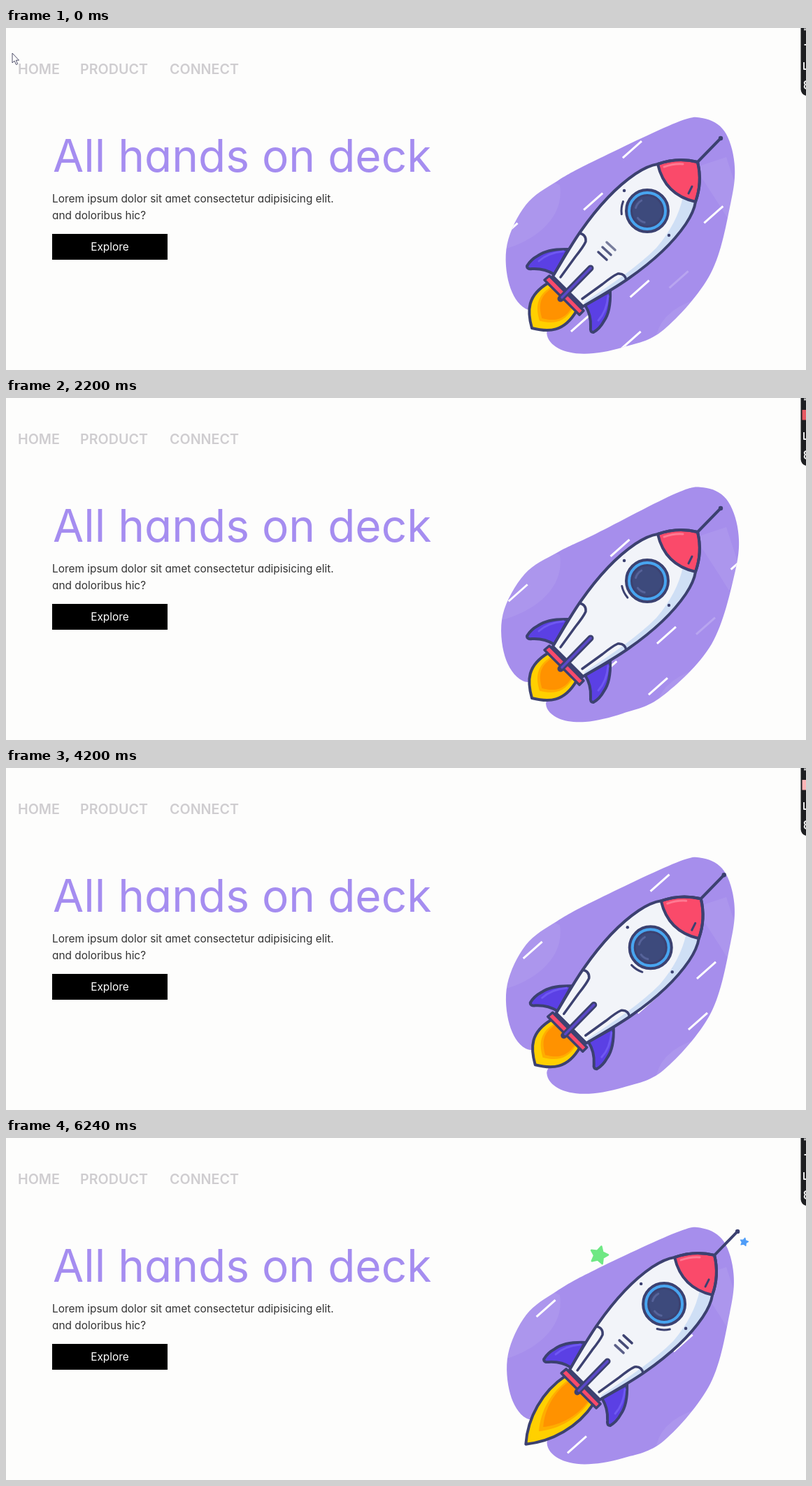
Write an HTML page with a canvas that moves like this. It is 1144 px wide and 490 px high and loops after 6280 ms.

```html
<!DOCTYPE html>
<html lang="en">
<head>
<meta charset="utf-8">
<title>All hands on deck</title>
<style>
  html, body { margin: 0; width: 100%; height: 100%; overflow: hidden; background: #fdfdfc; }
  canvas, svg { position: absolute; left: 0; top: 0; display: block; }
  text { font-family: Inter, "Open Sans", sans-serif; font-feature-settings: "cv11"; }
  .nav { font-size: 19.7px; font-weight: 600; fill: #cfcdd0; }
  .title { font-size: 64px; fill: #a58df0; }
  .copy { font-size: 15.4px; fill: #333; }
  .button { font-size: 15.4px; fill: #fff; text-anchor: middle; }
</style>
</head>
<body>
<svg width="1144" height="490">
  <g class="nav">
    <text x="17" y="66">HOME</text>
    <text x="106" y="66">PRODUCT</text>
    <text x="234" y="66">CONNECT</text>
  </g>
  <text class="title" x="67" y="206">All hands on deck</text>
  <text class="copy" x="66" y="250">Lorem ipsum dolor sit amet consectetur adipisicing elit.</text>
  <text class="copy" x="66" y="274">and doloribus hic?</text>
  <rect x="66" y="295" width="165" height="37"/>
  <text class="button" x="148.5" y="319">Explore</text>
</svg>
<canvas width="1144" height="490"></canvas>
<script>
const ctx = document.querySelector('canvas').getContext('2d');
const LOOP = 6280, HOP = 1200, RAIN = 2400, SWELL = 3000, BLINK = 2720;
const NAVY = '#3c4170', RED = '#fa4a6a', PURPLE = '#a68eec', VIOLET = '#5b40e4';
const TAU = Math.PI * 2;
const mix = (a, b, k) => a + (b - a) * k;
const wave = (t, period, peak) => Math.cos(TAU * (t - peak) / period);

function ease(t, from, to) {
  const k = Math.min(1, Math.max(0, (t - from) / (to - from)));
  return k * k * (3 - 2 * k);
}

// Rises from a to b, falls from c to d
const bump = (t, a, b, c, d) => ease(t, a, b) * (1 - ease(t, c, d));

function paint(path, fill, stroke, width = 4) {
  if (fill) { ctx.fillStyle = fill; ctx.fill(path); }
  if (stroke) { ctx.strokeStyle = stroke; ctx.lineWidth = width; ctx.stroke(path); }
}

const shape = (d, fill, stroke, width) => paint(new Path2D(d), fill, stroke, width);

function disc(x, y, r, fill, stroke, width) {
  const p = new Path2D();
  p.arc(x, y, r, 0, TAU);
  paint(p, fill, stroke, width);
}

function ring(r, middle, spread, color) {
  const p = new Path2D();
  p.arc(917, 262, r, middle - spread, middle + spread);
  paint(p, null, color, 3);
}

// Draws a part on both sides of the rocket's diagonal axis
function both(...part) {
  shape(...part);
  ctx.save();
  ctx.transform(0, -1, -1, 0, 1181, 1181);
  shape(...part);
  ctx.restore();
}

function smooth(pts) {
  const p = new Path2D(), n = pts.length;
  p.moveTo(...pts[0]);
  for (let i = 0; i < n; i++) {
    const a = pts[(i + n - 1) % n], b = pts[i], c = pts[(i + 1) % n], d = pts[(i + 2) % n];
    p.bezierCurveTo(b[0] + (c[0] - a[0]) / 6, b[1] + (c[1] - a[1]) / 6,
      c[0] - (d[0] - b[0]) / 6, c[1] - (d[1] - b[1]) / 6, c[0], c[1]);
  }
  return p;
}

const BLOB = [[997, 129], [1028, 147], [1043, 193], [1038, 250], [1008, 352], [940, 431], [882, 456],
  [828, 466], [790, 459], [773, 438], [786, 405], [742, 403], [718, 368], [715, 310], [743, 253],
  [788, 220], [843, 191], [958, 136]];

function blobPath(t) {
  const swell = -.03 * wave(t, SWELL, 650);
  return smooth(BLOB.map(([x, y]) => {
    const dx = x - 880, dy = y - 300;
    const k = 1 + swell * Math.cos(2 * Math.atan2(dy, dx) - TAU * 11 / 12);
    return [880 + dx * k, 300 + dy * k];
  }));
}

// A streak at a place across and along the diagonal
function streak(across, along, alpha = 1) {
  const x = .66 * across - .75 * along, y = .75 * across + .66 * along;
  ctx.globalAlpha = alpha;
  shape(`M${x - 13.5} ${y + 12}l27 -24`, null, '#fff', 3);
}

const LANES = [[723, 416], [742, 895], [861, 1574], [870, 280], [880, 1068], [927, 1370], [907, 800]];

function drawBlob(t) {
  const blob = blobPath(t);
  ctx.save();
  paint(blob, PURPLE);
  ctx.clip(blob);
  const glow = 'rgba(255,255,255,.07)';
  shape('M700 320 C750 310 800 275 792 225 L730 200 L690 300Z', glow);
  shape('M985 200 Q1012 240 1034 276 L1048 240 L1030 185Z', glow);
  shape('M930 440 Q940 400 1000 385 L1010 430Z', glow);
  ctx.lineCap = 'butt';
  for (const [across, lead] of LANES) {
    streak(across, -650 + .19 * ((t + lead) % RAIN), across === 907 ? .2 : 1);
  }
  streak(694, -500 + .07 * ((t + 2120) % RAIN));
  ctx.restore();
}

function star(x, y, r, color, turn) {
  if (r < .5) return;
  const p = new Path2D();
  for (let i = 0; i < 10; i++) {
    const a = turn + i * TAU / 10, d = i % 2 ? r * .52 : r;
    p.lineTo(x + d * Math.cos(a), y + d * Math.sin(a));
  }
  p.closePath();
  paint(p, color, color, r * .2);
}

function drawStars(hop) {
  const grow = bump(hop, 120, 225, 340, 450);
  star(848, 168, 13 * grow, '#6fe884', -.05);
  star(1055.5, 149, 6 * grow, '#4f9df8', -.1);
  star(752, 380, 4 * bump(hop, 380, 440, 490, 550), '#f7b3ae', .2);
}

function drawFlame(k) {
  const at = (a, b, c, d) => `${mix(a, c, k)} ${mix(b, d, k)} `;
  const d = 'M776 365 C' + at(745, 383, 742, 388) + at(745, 405, 718, 428) + at(752, 430, 714, 468) +
    'C' + at(776, 436, 753, 463) + at(798, 436, 793, 439) + '816 405Z';
  const layer = (scale, color) => {
    ctx.save();
    ctx.translate(797, 386);
    ctx.scale(scale, scale);
    ctx.translate(-797, -386);
    shape(d, color);
    ctx.restore();
  };
  layer(1, '#ffd000');
  layer(.76, '#ffad00');
  layer(.68, '#ff9200');
  shape(d, null, NAVY);
}

function drawHull() {
  both('M804 317 Q775 316 761 326 Q750 332 745 341 Q745 346 752 345 Q770 344 784 353Z', VIOLET, NAVY);
  both('M797 320 Q775 322 762 334', null, '#6f58f2', 3);

  const body = 'M782 356 C800 325 812 305 822 291 C845 258 872 228 900 209 Q918 197 932 195' +
    'Q960 185 989 192 Q996 221 986 249 Q984 263 972 281 C953 309 923 336 890 359' +
    'C876 369 856 381 825 399Z';
  shape(body, '#f2f4f9');
  shape('M986 249 Q984 263 972 281 C953 309 923 336 890 359 C876 369 856 381 825 399' +
    'L828 392 C870 365 905 340 930 315 Q960 280 968 242Z', '#cfdff5');
  shape('M932 195 Q960 185 989 192 Q996 221 986 249 Q942 239 932 195Z', RED, NAVY);
  shape('M941 199 Q955 194 968 195', null, '#ff7a92', 3);
  shape('M976 237 L981 227', null, NAVY, 3);
  shape(body, null, NAVY);

  both('M820 294 Q830 296 829 306 Q826 313 814 328 L793 357', null, NAVY, 3.5);
  shape('M770 361 L777 355 L826 405 L820 411Z', RED, NAVY, 3.5);
  shape('M836 344 L793 388', null, NAVY, 9);
  shape('M836 344 L795 386', null, '#5a49c8', 3.5);

  shape('M989 192 L1021 159', null, NAVY);
  disc(1022, 158, 3.2, NAVY);
  both('M884 233h.1', null, NAVY, 4.4);
}

function drawWindow(t) {
  disc(917, 262, 30, '#48a5f0', NAVY);
  disc(917, 262, 22.5, '#3d4a7c', NAVY, 3);
  ring(17, 2.15, .35, '#56639a');
  ring(17, 3.8, .4, '#56639a');
  ring(37, 3.28 - .00027 * t, .25, NAVY);
}

function drawRocket(t, hop) {
  const lift = 26 * bump(hop, 70, 275, 390, 680);
  ctx.save();
  ctx.translate(lift, -lift);
  ctx.lineCap = 'round';
  drawFlame(bump(hop, 80, 290, 320, 500));
  drawHull();
  drawWindow(t);
  for (let i = 0; i < 3; i++) {
    ctx.globalAlpha = Math.max(0, wave(hop, HOP, 230 - 50 * i));
    shape(`M${859 - 6 * i} ${307 + 7 * i}l12 11`, null, NAVY, 3.5);
  }
  ctx.restore();
}

function drawToolbar(t) {
  shape('M1144 0H1136.5V88Q1137 95 1144 97Z', '#1d1e21');
  shape('M1141 2H1144', null, '#bbb', 3);
  shape('M1141.5 24H1144', null, '#eee', 2);
  if (t > 1000 && t < 5700) {
    const tone = .5 + .5 * wave(t, BLINK, 1520);
    ctx.fillStyle = `rgb(${mix(208, 255, tone)},${mix(0, 180, tone)},${mix(16, 182, tone)})`;
    ctx.fillRect(1138.5, 17, 6, 14.5);
  }
  shape('M1141 49V59H1144', null, '#eee', 2);
  shape('M1144 76Q1140 78 1143 81Q1140 85 1144 87', null, '#eee', 2);
}

function drawCursor(t) {
  const x = 9 + .146 * t, y = 36 - 3.2e-5 * t * t;
  shape(`M${x} ${y}v14l3 -3l2.5 5.5l2.2 -1l-2.4 -5.3h4.2Z`, '#fff', '#50506a', 1);
}

function frame(now) {
  const t = Math.max(now % LOOP, 70), hop = t % HOP;
  ctx.clearRect(0, 0, 1144, 490);
  ctx.lineJoin = 'round';
  drawBlob(t);
  drawStars(hop);
  drawRocket(t, hop);
  drawToolbar(t);
  drawCursor(t - 70);
  requestAnimationFrame(frame);
}
requestAnimationFrame(frame);
</script>
</body>
</html>
```
